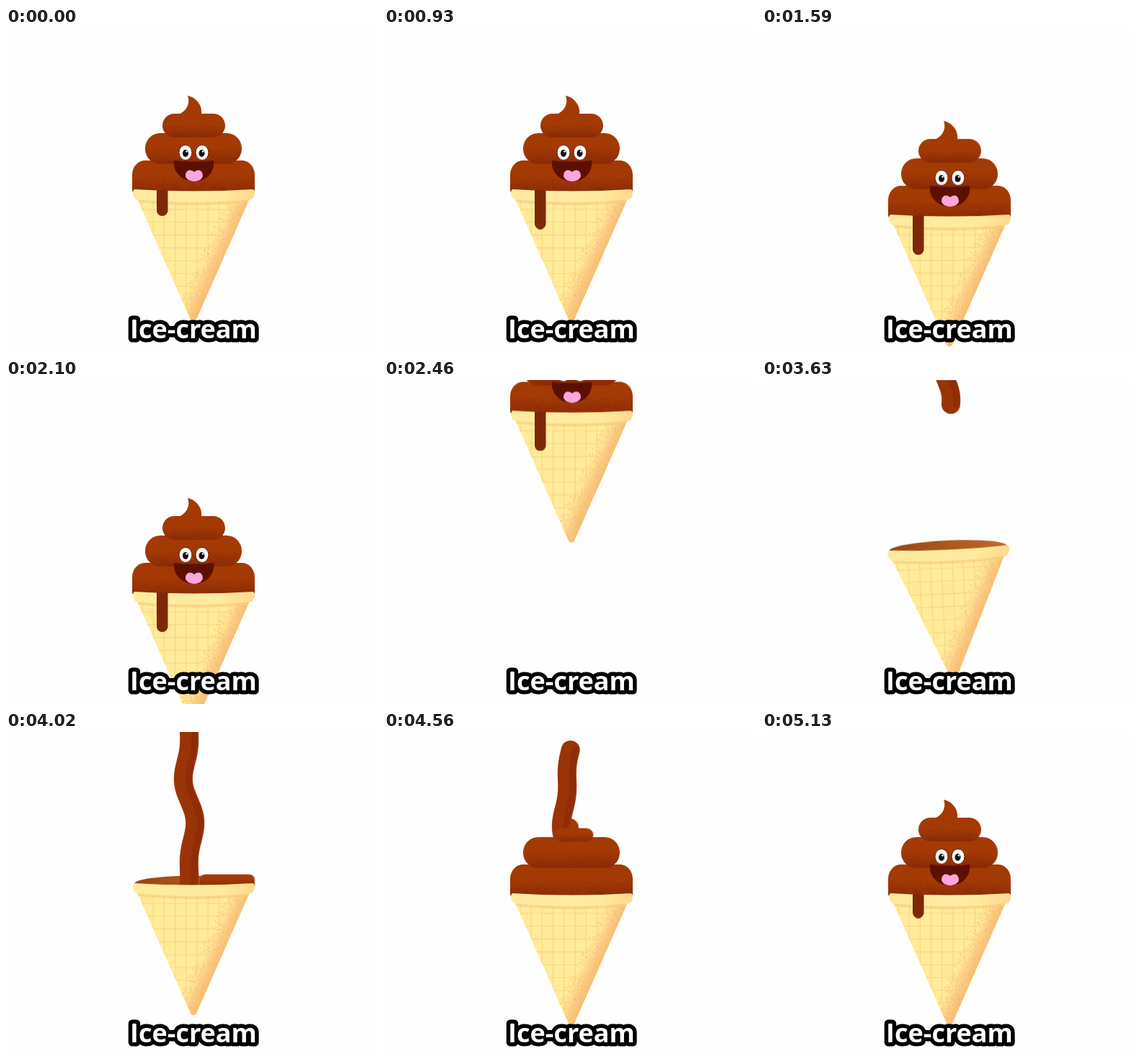
Animation of 516 by 450 pixels, one loop 5.16 s. Source, as an HTML page:

```html
<!DOCTYPE html>
<html lang="en">
<head>
<meta charset="utf-8">
<title>Ice-cream</title>
<style>
  html, body { margin: 0; width: 100%; height: 100%; overflow: hidden; background: #fefefe; }
  svg { display: block; width: 516px; height: 450px; }
  .spin { transform-origin: 260px 270px; }
  #pile { transform-origin: 260px 228px; }
  #bottom { transform-origin: 345px 228px; }
  #middle { transform-origin: 215px 190px; }
  #top { transform-origin: 268px 152px; }
  #face { transform-origin: 261px 190px; }
  .grain { fill: #74200a; opacity: .38; }
  text { font: 700 36px "Open Sans", "Noto Sans", sans-serif; text-anchor: middle; fill: #fff;
    stroke: #000; stroke-width: 11px; stroke-linejoin: round; paint-order: stroke; }
</style>
</head>
<body>
<svg viewBox="0 0 516 450">
  <defs>
    <linearGradient id="choc" x2="0" y2="1">
      <stop offset=".45" stop-color="#a43a03"/>
      <stop offset="1" stop-color="#8c2b08"/>
    </linearGradient>
    <linearGradient id="inside">
      <stop stop-color="#994412"/>
      <stop offset="1" stop-color="#c06a28"/>
    </linearGradient>
    <linearGradient id="shade" gradientUnits="userSpaceOnUse" x1="301" y1="320" x2="275" y2="308">
      <stop stop-color="#f7bf78"/>
      <stop offset=".4" stop-color="#fbcf87"/>
      <stop offset="1" stop-color="#ffeb99" stop-opacity="0"/>
    </linearGradient>
    <linearGradient id="rim">
      <stop offset=".7" stop-color="#ffeb9f"/>
      <stop offset="1" stop-color="#fdd98d"/>
    </linearGradient>
    <path id="wafer" d="M181.5 236 L256 405 Q260 410 264 405 L338.5 236 Z"/>
    <clipPath id="inWafer"><use href="#wafer"/></clipPath>
    <clipPath id="aboveRim"><rect x="150" y="-400" width="220" height="630"/></clipPath>
    <clipPath id="belowPile"><rect x="200" y="225" width="40" height="80"/></clipPath>
  </defs>

  <g id="hop">
    <g class="spin">
      <ellipse cx="260" cy="225" rx="82" ry="11.5" fill="url(#inside)"/>
    </g>

    <g clip-path="url(#aboveRim)">
      <g id="stream" fill="none" stroke-linecap="round">
        <polyline class="wave" stroke="#9a3306" stroke-width="26"/>
        <polyline class="wave" stroke="#7c250a" stroke-width="8" opacity=".4" transform="translate(7 0)"/>
      </g>
    </g>

    <g class="spin">
      <g id="pile">
        <g id="bottom">
          <path fill="url(#choc)" d="M193 184 H327 C338 184 345 194 345 204 V224 Q345 230 339 230 H181 Q175 230 175 224 V204 C175 194 182 184 193 184 Z"/>
        </g>
        <g id="middle">
          <rect x="193" y="146" width="134" height="43" rx="21" fill="url(#choc)"/>
        </g>
        <g id="top">
          <rect x="217" y="119" width="87" height="33" rx="16.5" fill="url(#choc)"/>
          <path fill="#a43a03" d="M252 94 C263 96 273 107 271 120 L287 123 V134 H230 V123 C247 120 257 108 252 94 Z"/>
        </g>
        <g id="face">
          <g fill="#fff" stroke="#6b1c05" stroke-width="1">
            <ellipse cx="249" cy="173" rx="9" ry="10.5"/>
            <ellipse cx="272" cy="173" rx="9" ry="10.5"/>
          </g>
          <g fill="#17100e">
            <ellipse cx="249" cy="174" rx="4" ry="5"/>
            <ellipse cx="271.5" cy="174" rx="4" ry="5"/>
          </g>
          <g fill="#fff"><circle cx="250.5" cy="171.5" r="1.3"/><circle cx="273" cy="171.5" r="1.3"/></g>
          <path fill="#5c1002" d="M233 184 Q261 187 288 184 C290 201 277 213 261 213 C245 213 231 201 233 184 Z"/>
          <path fill="#fba6dc" d="M249 206 C249 196 257 196 261 200 C265 196 273 196 273 206 C271 211 266 213 261 213 C256 213 251 211 249 206 Z"/>
        </g>
      </g>

      <use href="#wafer" fill="#ffeb99"/>
      <g clip-path="url(#inWafer)">
        <path id="grid" fill="none" stroke="#f7d583" stroke-width="1.1"/>
        <use href="#wafer" fill="url(#shade)"/>
        <path id="crumbs" fill="#f3b566" opacity=".65"/>
        <path d="M178 239 Q260 248 343 239" fill="none" stroke="#f8cd80" stroke-width="5" opacity=".7"/>
      </g>
      <path fill="url(#rim)" d="M178 224 Q260 229 343 224 Q348 230 341 238 Q260 246 180 238 Q173 230 178 224 Z"/>
      <g clip-path="url(#belowPile)">
        <rect id="drip" x="209" y="180" width="15.5" height="100" rx="7.7" fill="#7e2807"/>
      </g>
    </g>
  </g>

  <text x="260" y="431">Ice-cream</text>
</svg>

<script>
const LOOP = 5160;
const $ = id => document.getElementById(id);

let seed = 7;
const random = () => (seed = seed * 16807 % 2147483647) / 2147483647;

// Speckles: place() returns the corner of each small square.
const specks = (count, place) => Array.from({ length: count }, () => {
  const [x, y] = place();
  return `M${x.toFixed(1)} ${y.toFixed(1)}h1.3v1.3h-1.3z`;
}).join('');

function addGrain(id, left, right, low, depth, count) {
  const path = document.createElementNS('http://www.w3.org/2000/svg', 'path');
  path.setAttribute('class', 'grain');
  path.setAttribute('d', specks(count, () =>
    [left + random() * (right - left), low - depth * random() ** 2]));
  $(id).append(path);
}
addGrain('bottom', 179, 341, 226, 20, 230);
addGrain('middle', 208, 312, 186, 18, 140);
addGrain('top', 232, 290, 149, 14, 80);

$('crumbs').setAttribute('d', specks(480, () => {
  const y = 242 + random() * 158;
  const edge = 336 - (y - 240) * 0.455;
  return [edge - 32 * random() ** 1.2, y];
}));

let grid = '';
for (let x = 189; x < 340; x += 15.2) grid += `M${x} 240V410`;
for (let y = 252; y < 400; y += 17.8) grid += `M180 ${y}H340`;
$('grid').setAttribute('d', grid);

const wave = Array.from({ length: 125 }, (_, i) => {
  const angle = (i * 6 - 517) / 190 * 2 * Math.PI;
  const x = 254 + 6 * Math.sin(angle) + 3.5 * Math.sin(2 * angle);
  return `${x.toFixed(1)},${i * 6}`;
}).join(' ');
document.querySelectorAll('.wave').forEach(line => line.setAttribute('points', wave));

const SMOOTH = 'cubic-bezier(.37,0,.63,1)';
const OUT = 'cubic-bezier(.333,.667,.667,1)';
const IN = 'cubic-bezier(.333,0,.667,.333)';

// Steps are [ms, value, easing to the next step].
function move(selector, format, steps) {
  const last = steps[steps.length - 1];
  const full = last[0] < LOOP ? [...steps, [LOOP, last[1]]] : steps;
  const frames = full.map(([ms, value, easing = 'linear']) =>
    ({ offset: ms / LOOP, transform: format(value), easing }));
  document.querySelectorAll(selector).forEach(part =>
    part.animate(frames, { duration: LOOP, iterations: Infinity }));
}
const shiftY = v => `translateY(${v}px)`;
const rotate = v => `rotate(${v}deg)`;
const scale = v => `scale(${v})`;

move('#hop', shiftY, [
  [0, 0], [1110, 0, SMOOTH], [2070, 70], [2115, 70, OUT], [2320, -406, IN], [2580, 358],
  [2600, 460], [2600, -420], [2940, -420], [2940, -365], [2970, -365, OUT], [3400, 90, SMOOTH],
  [3800, -40, SMOOTH], [4020, -14, SMOOTH], [4260, 8, SMOOTH], [4500, 0]
]);
move('.spin', rotate, [
  [0, 0], [2600, 0], [2600, -47], [2970, -47, IN], [3240, -42.3], [3510, -18, OUT],
  [3760, 3, SMOOTH], [3950, 0]
]);
move('#stream', shiftY, [
  [0, -1600], [3600, -1600], [3600, -744], [4800, 216], [4800, -1600]
]);

const grow = (selector, start, mid, end, small) => move(selector, scale, [
  [0, '1, 1'], [2600, '1, 1'], [2600, '0, 0'], [start, '0, 0'],
  [mid, small, SMOOTH], [end, '1, 1']
]);
grow('#bottom', 3890, 4020, 4240, '.45, .37');
grow('#middle', 4200, 4290, 4440, '.45, .4');
grow('#top', 4400, 4490, 4660, '.4, .3');
grow('#face', 4690, 4730, 4830, '.4, .4');

move('#pile', scale, [
  [0, '1, 1'], [4590, '1, 1', SMOOTH], [4650, '1.02, .93', SMOOTH], [4770, '.95, 1.3', SMOOTH],
  [4900, '1.02, .95', SMOOTH], [5010, '1, 1.02', SMOOTH], [5100, '1, 1']
]);

// The drip slows down as it gets longer and runs on across the loop point.
const sag = ms => -19 * Math.exp(-ms / 250);
const run = (from, to) => Array.from({ length: (to - from) / 60 + 1 }, (_, i) => from + i * 60);
move('#drip', shiftY, [
  ...run(0, 1500).map(ms => [ms, sag(ms)]),
  [2600, 0], [2600, -56], [4890, -56],
  ...run(-240, 0).map(ms => [LOOP + ms, sag(ms)])
]);
</script>
</body>
</html>
```
